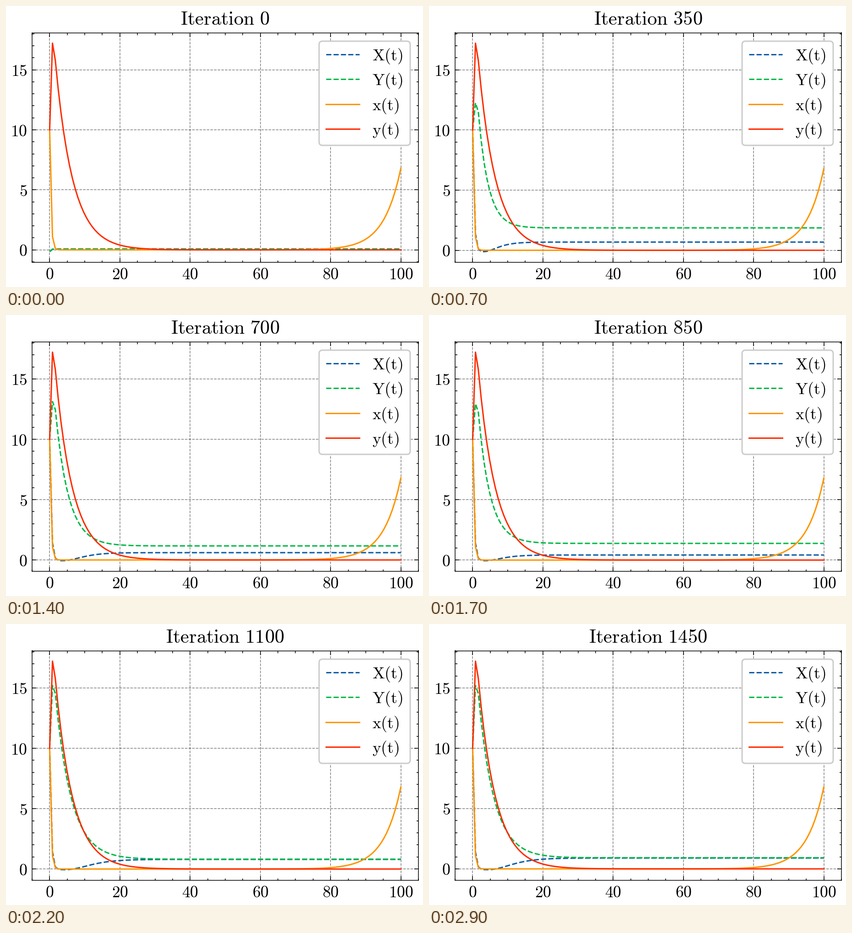
A matplotlib script for the animation above (3000 ms loop, 911 by 615 pixels).

```python
import numpy as np
import matplotlib.pyplot as plt
from matplotlib.animation import FuncAnimation
from matplotlib.patches import FancyBboxPatch
from matplotlib.ticker import MultipleLocator

W, H, DPI = 911, 615, 128
PX = 72 / DPI  # points per pixel
BLUE, GREEN, ORANGE, RED = "#0C5DA5", "#00B945", "#FF9500", "#FF2C00"
LEFT, RIGHT, TOP, BOTTOM = 57, 901, 58.5, 560.5
FRAMES, STEP = 30, 50

plt.rcParams["mathtext.fontset"] = "cm"

t = np.linspace(0, 100, 125)

# Exact solution: x collapses and regrows late, y jumps and decays
x_true = 10 * np.exp(-2.75 * t) + 6.8 * np.exp(0.203 * (t - 100))
y_true = 21.8 * np.exp(-0.2 * t)
y_true[:2] = 10, 17.22

# Shape of the learned curves at a few stages of the training
stages = [0, 4, 7, 11, 17, 22, 29]
peak = [0.07, 10, 12.25, 13.3, 12.95, 15.2, 15.2]
y_floor = [0.07, 3.6, 1.86, 0.95, 1.38, 0.81, 0.92]
x_floor = [0.07, 0.54, 0.68, 0.79, 0.42, 0.8, 0.9]
rate = [0.58, 0.58, 0.35, 0.238, 0.295, 0.219, 0.226]


def learned(frame):
    """Learned X and Y: Y holds its peak, then decays; X recovers as Y fades."""
    top_y, low_y, low_x, r = (np.interp(frame, stages, v)
                              for v in (peak, y_floor, x_floor, rate))
    start = np.interp(frame, stages[:2], [-0.15, 10])
    spike = np.clip(top_y - 10, 0, 1)
    excess = (top_y - low_y) * np.exp(-r * np.maximum(t - 1.4 * spike, 0))
    y = low_y + excess
    y[0] = start
    drain = spike * excess
    x = low_x * (1 - r * drain) * np.exp(-0.3 * drain) + start * np.exp(-2.4 * t)
    x[0] = start
    return x, y


fig = plt.figure(figsize=(W / DPI, H / DPI), dpi=DPI, facecolor="white")
ax = fig.add_axes([LEFT / W, 1 - BOTTOM / H, (RIGHT - LEFT) / W, (BOTTOM - TOP) / H])
ax.set_xlim(-5, 105)
for axis, major, minor in ((ax.xaxis, 20, 5), (ax.yaxis, 5, 1)):
    axis.set_major_locator(MultipleLocator(major))
    axis.set_minor_locator(MultipleLocator(minor))
    axis.set_major_formatter(lambda v, pos: f"${v:.0f}$")
ax.tick_params(which="both", direction="in", top=True, right=True, width=1.5 * PX)
ax.tick_params(which="major", length=9.1 * PX, labelsize=35.5 * PX)
ax.tick_params(which="minor", length=4.5 * PX)
ax.tick_params(axis="x", pad=11 * PX)
ax.tick_params(axis="y", pad=10.6 * PX)
ax.grid(color="black", alpha=0.5, linestyle="--", linewidth=1.5 * PX)
for spine in ax.spines.values():
    spine.set_linewidth(1.5 * PX)

line_width = 3.03 * PX
x_line, = ax.plot(t, t, "--", color=BLUE, lw=line_width)
y_line, = ax.plot(t, t, "--", color=GREEN, lw=line_width)
ax.plot(t, x_true, color=ORANGE, lw=line_width)
ax.plot(t, y_true, color=RED, lw=line_width)

# Title and legend in pixel coordinates
top = fig.add_axes([0, 0, 1, 1])
top.set_xlim(0, W)
top.set_ylim(H, 0)
top.set_axis_off()
title = top.text(478.3, 41, "", size=42.4 * PX, ha="center", va="baseline")
top.add_patch(FancyBboxPatch((684, 77), 199, 228, boxstyle="round,pad=0,rounding_size=7.3",
                             fc="white", ec="0.8", lw=line_width))
entries = (("X", BLUE, "--", 106), ("Y", GREEN, "--", 160),
           ("x", ORANGE, "-", 215), ("y", RED, "-", 269))
for name, color, style, y in entries:
    top.plot([699, 771.5], [y, y], style, color=color, lw=line_width)
    top.text(800.5, y + 12.7, rf"$\mathrm{{{name}(t)}}$", size=35.5 * PX, va="baseline")


def update(frame):
    x, y = learned(frame)
    x_line.set_ydata(x)
    y_line.set_ydata(y)
    low = min(x.min(), y.min(), x_true.min(), y_true.min())
    high = y_true.max()
    margin = 0.05 * (high - low)
    ax.set_ylim(low - margin, high + margin)
    title.set_text(rf"$\mathrm{{Iteration\ {frame * STEP}}}$")
    return x_line, y_line, title


anim = FuncAnimation(fig, update, frames=FRAMES, interval=100, repeat=True, repeat_delay=0)
plt.show()
```
